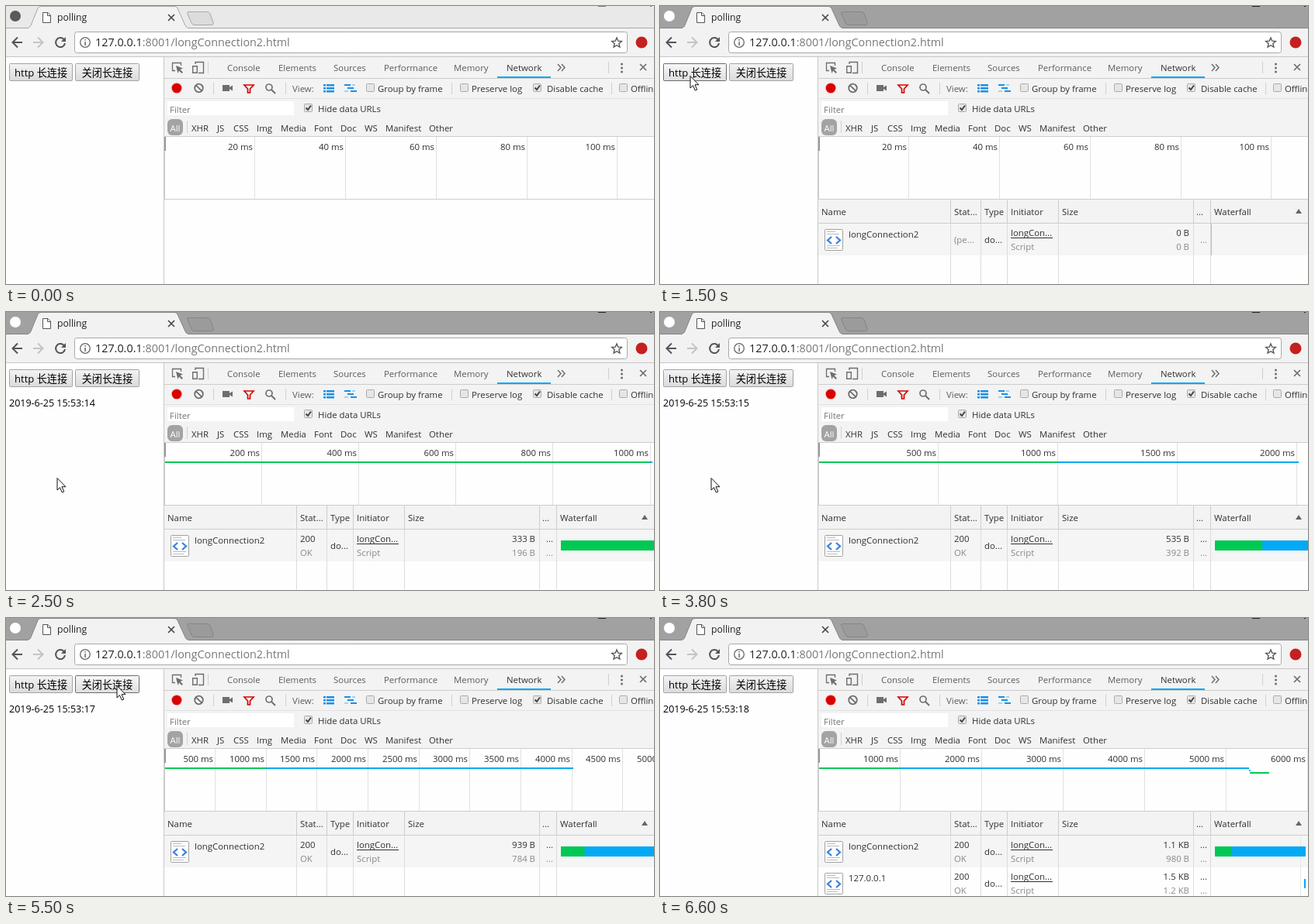
Recreate the animation shown at these times as an HTML page with a canvas. Size 835 by 359 pixels, loop 7300 ms.

```html
<!DOCTYPE html>
<html lang="en">
<head>
<meta charset="utf-8">
<title>Long connection demo</title>
<style>
html, body { margin: 0; width: 100%; height: 100%; overflow: hidden; background: #fefefe; }
canvas { display: block; }
</style>
</head>
<body>
<canvas id="stage" width="835" height="359"></canvas>
<script>
const c = document.getElementById('stage').getContext('2d');
const LOOP = 7300;
const SANS = '"Open Sans", "Noto Sans CJK SC", "Noto Sans CJK", sans-serif';
const GREEN = '#00c853', BLUE = '#03a9f4', GRAY = '#6e6e6e', INK = '#303030';

// time, x, y of the pointer; it holds until the next entry
const pointer = [
  [200, 826, 262], [300, 625, 267], [400, 357, 292], [500, 147, 231], [600, 89, 164],
  [700, 57, 132], [800, 43, 109], [900, 39, 90], [1800, 40, 96], [1900, 41, 134],
  [2000, 66, 214], [4000, 65, 215], [4700, 117, 205], [4800, 121, 193], [4900, 126, 177],
  [5000, 132, 157], [5100, 137, 131], [5200, 140, 110], [5300, 142, 95], [5400, 143, 87],
  [6100, 158, 91], [6200, 210, 112], [6300, 350, 150], [6400, 580, 190], [6500, 800, 235],
  [6600, 900, 250]
];

// network states: overview scale in px per ms, tick step, request duration
const network = [
  { at: 0, scale: 5.838, tick: 20, total: 0, size: ['0 B', '0 B'] },
  { at: 2500, scale: .6262, tick: 200, total: 1006, size: ['333 B', '196 B'] },
  { at: 3400, scale: .308, tick: 500, total: 2010, size: ['535 B', '392 B'] },
  { at: 4300, scale: .2054, tick: 500, total: 3015, size: ['737 B', '588 B'], grid: 795 },
  { at: 5300, scale: .1313, tick: 500, total: 4020, size: ['939 B', '784 B'] },
  { at: 6300, scale: .105, tick: 1000, total: 5030, size: ['1.1 KB', '980 B'] },
  { at: 6600, scale: .105, tick: 1000, total: 5290, size: ['1.1 KB', '980 B'], grid: 825, second: true }
];
const clock = [[2400, 14], [3400, 15], [4300, 16], [5300, 17], [6300, 18]];

function rect(x, y, w, h, color) {
  c.fillStyle = color;
  c.fillRect(x, y, w, h);
}
function text(s, x, y, color = INK, size = 11.4, align = 'left') {
  c.font = size + 'px ' + SANS;
  c.textAlign = align;
  c.fillStyle = color;
  c.fillText(s, x, y);
}
function shape(d, stroke, fill, width = 1, x = 0, y = 0) {
  const p = new Path2D(d);
  c.save();
  c.translate(x, y);
  c.lineWidth = width;
  if (fill) { c.fillStyle = fill; c.fill(p); }
  if (stroke) { c.strokeStyle = stroke; c.stroke(p); }
  c.restore();
}
function disc(x, y, r, fill, stroke, width = 1) {
  c.beginPath();
  c.arc(x, y, r, 0, 7);
  c.lineWidth = width;
  if (fill) { c.fillStyle = fill; c.fill(); }
  if (stroke) { c.strokeStyle = stroke; c.stroke(); }
}
function box(x, y, w, h, r, fill, stroke) {
  c.beginPath();
  c.roundRect(x, y, w, h, r);
  c.fillStyle = fill;
  c.fill();
  if (stroke) { c.lineWidth = 1; c.strokeStyle = stroke; c.stroke(); }
}
function checkbox(x, y, label, labelX, checked) {
  box(x + .5, y + .5, 10, 10, 1, '#e6e6e6', '#ababab');
  if (checked) shape('M2.5 5.5L5 8L9 2.5', '#444', null, 2, x, y);
  text(label, labelX, y + 11);
}
const last = (list, t, key) => list.filter(e => e[key] <= t).pop();

function drawBrowser(active) {
  const edge = active ? '#858585' : '#a8a8a8';
  rect(0, 0, 835, 28, active ? '#a1a1a1' : '#e9e9e9');
  rect(0, 28, 835, 37, '#f2f2f2');
  rect(0, 28, 835, 1, edge);
  rect(0, 65, 835, 1, '#c6c6c6');
  disc(12, 13, 7, active ? '#fff' : '#5a5a5a');
  rect(763, 0, 10, 1, active ? '#222' : '#777');
  rect(830, 0, 2, 1, active ? '#222' : '#777');
  shape('M28 28.5Q31 28 32 25L41 3Q42 .5 45 .5H217Q220 .5 221 3L231 25Q232 28 235 28.5', edge, '#f2f2f2');
  rect(29, 28, 205, 2, '#f2f2f2');
  shape('M235 7.5H259Q262 7.5 263 10L267 21Q268 24.5 265 24.5H243Q240 24.5 239 22L234 10Q233 7.5 235 7.5Z',
    edge, active ? '#9b9b9b' : '#dcdcdc');
  shape('M47.5 8.5H54L57.5 12V21.5H47.5ZM53.5 8.5V12.5H57.5', '#555', '#fff');
  text('polling', 66, 19, '#222', 12.2);
  shape('M209 11L217 19M217 11L209 19', '#444', null, 1.6);

  shape('M21 47H9M15 40.5L8.5 47L15 53.5', '#555', null, 2);
  shape('M35 47H47M41 40.5L47.5 47L41 53.5', '#c4c4c4', null, 2);
  shape('M74.5 43A6 6 0 1 0 76 48', '#555', null, 2);
  shape('M77 40V46H71Z', null, '#555');
  box(88.5, 33.5, 712, 27, 3, '#fff', '#a9a9a9');
  disc(102, 47, 6.3, null, '#666', 1.3);
  rect(101.3, 46, 1.5, 5, '#666');
  rect(101.3, 43, 1.5, 1.6, '#666');
  text('127.0.0.1', 115, 52, '#222', 14.35);
  const hostWidth = c.measureText('127.0.0.1').width;
  text(':8001/longConnection2.html', 115 + hostWidth, 52, '#777', 14.35);
  shape('M787 41L788.8 45.2L793.3 45.6L789.9 48.6L790.9 53L787 50.7L783.1 53L784.1 48.6L780.7 45.6L785.2 45.2Z', '#555', null, 1.4);
  disc(819, 47, 7.5, '#c4201f');
}

function button(x, w, label, hover) {
  const g = c.createLinearGradient(0, 74, 0, 97);
  g.addColorStop(0, hover ? '#f8f8f8' : '#f4f4f4');
  g.addColorStop(1, hover ? '#dedede' : '#dadada');
  box(x + .5, 74.5, w - 1, 22, 1, g, hover ? '#6c6c6c' : '#a3a3a3');
  text(label, x + w / 2, 91, '#000', 13.1, 'center');
}

function drawPage(t) {
  rect(0, 66, 204, 293, '#fefefe');
  button(4, 82, 'http 长连接', t >= 900 && t < 1900);
  button(89, 83, '关闭长连接', t >= 5300 && t < 6200);
  const tick = last(clock, t, 0);
  if (tick) text('2019-6-25 15:53:' + tick[1], 4, 122, '#000', 12.5);
}

function drawTools() {
  rect(204, 66, 631, 103, '#f3f3f3');
  rect(204, 169, 631, 190, '#fefefe');
  for (const y of [93, 119, 168]) rect(204, y, 631, 1, y === 119 ? '#e2e2e2' : '#cdcdcd');
  rect(203, 66, 1, 293, '#c8c8c8');

  shape('M225.5 77V73.5H214.5V83.5H218', GRAY, null, 1.3);
  shape('M219 77L228 80.5L224.5 82L228 85.5L226.5 87L223 83.5L221.5 87Z', null, GRAY);
  shape('M244 75V72.5H254.5V86.5H248', GRAY, null, 1.4);
  shape('M240.7 77.7H246.3V86.3H240.7Z', GRAY, null, 1.4);
  const tabs = { Console: 285, Elements: 351, Sources: 422, Performance: 487, Memory: 577, Network: 645 };
  for (const name in tabs) text(name, tabs[name], 84, name === 'Network' ? '#303030' : '#5c5c5c');
  rect(633, 91, 69, 2, BLUE);
  shape('M711 75L715 79.5L711 84M716 75L720 79.5L716 84', GRAY, null, 1.5);
  for (const y of [75, 80, 85]) disc(793.5, y, 1.5, GRAY);
  shape('M817 75L825 83M825 75L817 83', GRAY, null, 1.7);

  disc(220, 106, 7.5, '#f3d3d3');
  disc(220, 106, 6.3, '#d80000');
  disc(248.5, 106, 5.3, null, GRAY, 1.8);
  shape('M244.7 102.3L252.3 109.7', GRAY, null, 1.8);
  shape('M279 102H288V105L292 102.5V109.5L288 107V110H279Z', null, GRAY);
  shape('M307 102H319L314.5 107V112H311.5V107Z', '#d80000', null, 1.7);
  disc(339, 105, 4, null, GRAY, 1.7);
  shape('M342 108L347 113', GRAY, null, 2);
  text('View:', 369, 111, '#5c5c5c');
  for (let i = 0; i < 3; i++) {
    rect(409, 101 + i * 4, 3, 2.5, '#1a8fe8');
    rect(413, 101 + i * 4, 10, 2.5, '#1a8fe8');
  }
  for (const [x, y, w] of [[436, 101, 8], [440, 105, 8], [444, 109, 8]]) rect(x, y, w, 2, '#1a8fe8');
  shape('M446 102H450M436 110H441', '#8bc6f4', null, 1.5);
  for (const [x, y, h] of [[260, 72, 15], [267, 99, 15], [360, 99, 15], [574, 99, 15], [776, 72, 15], [780, 99, 15], [233, 148, 16]])
    rect(x, y, 1, h, '#d0d0d0');
  checkbox(464, 100, 'Group by frame', 479);
  checkbox(585, 100, 'Preserve log', 600);
  checkbox(679, 100, 'Disable cache', 697, true);
  checkbox(790, 100, 'Offline', 805);

  rect(208, 123, 163, 18, '#fff');
  text('Filter', 211, 138, '#767676');
  checkbox(384, 126, 'Hide data URLs', 402, true);
  box(208, 146, 20, 21, 6, '#a3a3a3');
  text('All', 218, 162, '#fff', 11.4, 'center');
  const types = { XHR: 239, JS: 272, CSS: 293, Img: 323, Media: 354, Font: 397, Doc: 431, WS: 462, Manifest: 489, Other: 545 };
  for (const name in types) text(name, types[name], 162);
}

function drawOverview(n) {
  const at = ms => Math.floor(204 + ms * n.scale);
  for (let ms = n.tick; at(ms) < 900; ms += n.tick) {
    rect(at(ms), 169, 1, 80, '#e1e1e1');
    text(ms + ' ms', at(ms) - 2, 186, INK, 11.4, 'right');
  }
  rect(204, 169, 2, 18, '#999');
  rect(204, 187, 1, 62, '#ccc');
  rect(204, 249, 631, 1, '#cdcdcd');
  if (n.total) {
    rect(205, 193, at(n.total) - 205, 2, BLUE);
    rect(205, 193, at(1000) - 205, 2, GREEN);
  }
  if (n.second) {
    rect(759, 196, 2, 2, BLUE);
    rect(760, 199, 25, 2, GREEN);
  }
}

function row(y, name, size, done) {
  box(212.5, y + 7.5, 23, 27, 1, '#fff', '#a2a2a2');
  for (let i = 0; i < 8; i++) rect(215, y + 10 + i * 3, 11 + i * 5 % 8, 1, '#b9b9b9');
  rect(214, y + 16, 20, 12, '#fff');
  shape('M221 17L216 21.5L221 26M227 17L232 21.5L227 26', '#3b82e0', null, 2.3, 0, y);
  text(name, 243, y + 18);
  if (done) {
    text('200', 379, y + 16);
    text('OK', 379, y + 34, '#888');
  } else text('(pe...', 379, y + 25, '#888');
  text('do...', 418, y + 25);
  text('longCon...', 452, y + 16);
  rect(452, y + 18, 54, 1, INK);
  text('Script', 452, y + 34, '#888');
  text(size[0], 682, y + 16, INK, 11.4, 'right');
  text(size[1], 682, y + 34, '#888', 11.4, 'right');
  text('...', 696, y + (done ? 16 : 25), done ? INK : '#888');
  if (done) text('...', 696, y + 34, '#888');
}

function drawTable(n) {
  rect(204, 250, 631, 31, '#f3f3f3');
  rect(204, 280, 631, 1, '#cdcdcd');
  rect(204, 281, 631, 41, '#f5f5f5');
  if (n.grid) rect(n.grid, 281, 1, 78, '#e6e6e6');
  for (const x of [374, 413, 447, 513, 687, 709]) {
    rect(x, 250, 1, 109, '#dcdcdc');
    rect(x, 250, 1, 31, '#cdcdcd');
  }
  const heads = { Name: 208, 'Stat...': 379, Type: 418, Initiator: 452, Size: 518, '...': 691, Waterfall: 714 };
  for (const name in heads) text(name, heads[name], 270);
  shape('M819 268H827L823 262Z', null, '#666');
  row(281, 'longConnection2', n.size, n.total > 0);
  if (n.total) {
    const full = n.second ? 117 : 123;
    rect(715, 295, full, 13, BLUE);
    rect(715, 295, full * 1000 / n.total, 13, GREEN);
  } else rect(710, 281, 1, 41, '#bbb');
  if (n.second) {
    row(322, '127.0.0.1', ['1.5 KB', '1.2 KB'], true);
    rect(830, 337, 2, 12, BLUE);
  }
}

function draw() {
  const t = performance.now() % LOOP;
  const n = last(network, t, 'at');
  drawBrowser(t >= 1500);
  drawPage(t);
  drawTools();
  drawOverview(n);
  if (t >= 1500) drawTable(n);
  const p = last(pointer, t, 0);
  if (p) shape('M.5 .5V16L4 12.6L6.8 19L9.3 18L6.5 11.7H11.5Z', '#111', '#fff', 1, p[1] - .5, p[2]);
  requestAnimationFrame(draw);
}
draw();
</script>
</body>
</html>
```
